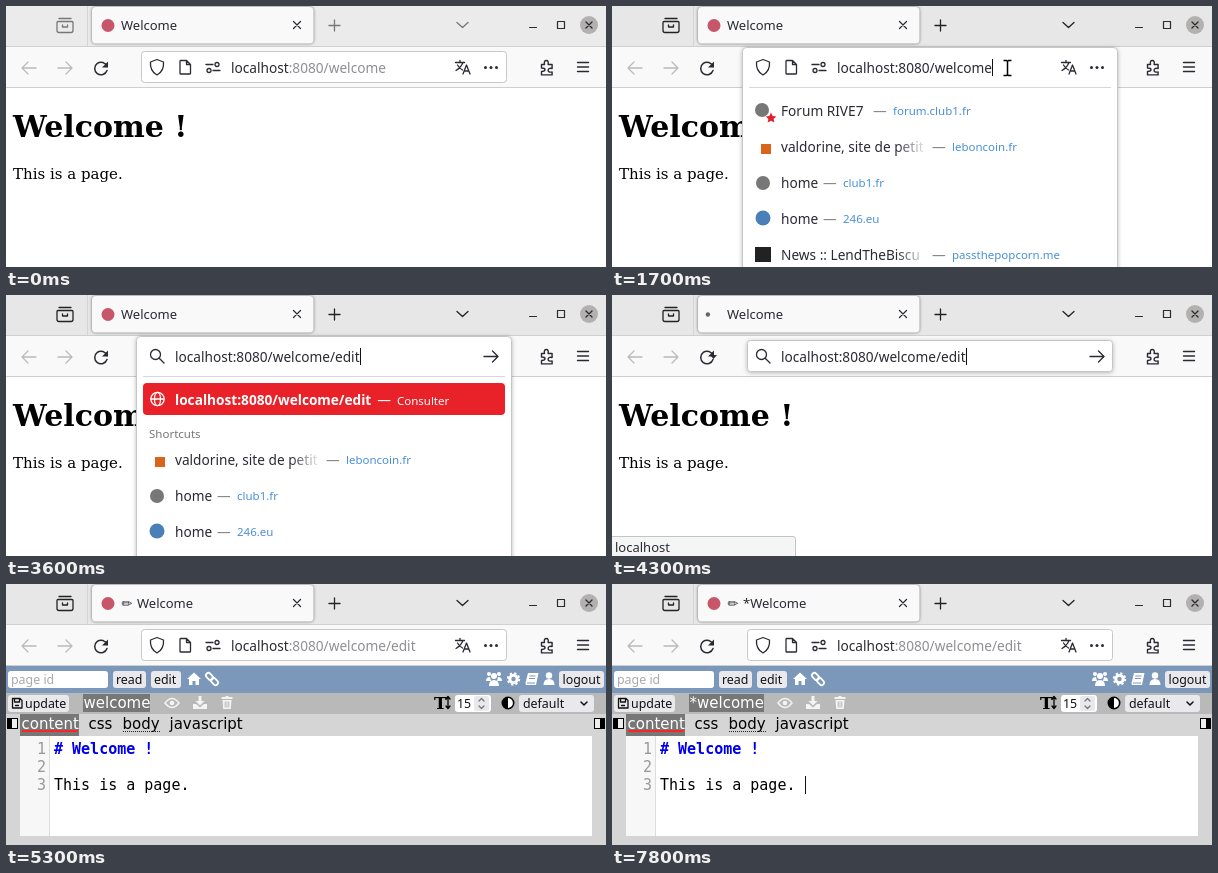
Recreate the animation shown at these times as an HTML page. Size 600 by 261 pixels, loop 8 s.

```html
<!DOCTYPE html>
<html lang="en">
<head>
<meta charset="utf-8">
<title>Editing a page in the browser</title>
<style>
html, body { margin: 0; width: 100%; height: 100%; overflow: hidden; background: #fff; }
svg { display: block; width: 100%; height: 100%; }
text { font: 13.67px "Noto Sans", sans-serif; fill: #2b2a33; white-space: pre; }
.tab { font-size: 13px; }
.small { font-size: 11.5px; }
.btn { font-size: 12.4px; fill: #111; }
.serif { font: 15px "DejaVu Serif", serif; fill: #000; }
.sans { font: 15px "DejaVu Sans", sans-serif; fill: #000; }
.mono { font: 15px "DejaVu Sans Mono", monospace; fill: #000; }
.dash { fill: #888; }
.link { font-size: 11.5px; fill: #4a90d9; }
.grey { fill: #8f8f94; }
.white { fill: #fff; }
.icon { fill: none; stroke: #2b2a33; stroke-width: 1.3; stroke-linecap: round; stroke-linejoin: round; }
.solid { fill: #fff; stroke: none; }
.popup { fill: #fff; stroke: #c6c6c6; filter: drop-shadow(0 1px 2px #0004); }
.caret { fill: #111; }
</style>
</head>
<body>
<!-- data-on lists the time spans, in ms, during which an element is shown -->
<svg viewBox="0 0 600 261">
  <defs>
    <linearGradient id="fade">
      <stop offset="0" stop-color="#fff" stop-opacity="0"/>
      <stop offset="1" stop-color="#fff"/>
    </linearGradient>
    <g id="shortcuts">
      <rect x="149" y="138" width="10" height="10" fill="#d9641c"/>
      <text x="169" y="146">valdorine, site de petit</text>
      <rect x="284" y="130" width="31" height="22" fill="url(#fade)"/>
      <rect x="315" y="130" width="9" height="22" fill="#fff"/>
      <text x="320" y="146" class="dash">—</text><text x="340" y="145" class="link">leboncoin.fr</text>
      <circle cx="151" cy="177" r="7" fill="#777"/>
      <text x="169" y="182">home</text>
      <text x="211" y="182" class="dash">—</text><text x="231" y="181" class="link">club1.fr</text>
      <circle cx="151" cy="212" r="7.5" fill="#4a80b8"/>
      <text x="169" y="218">home</text>
      <text x="211" y="218" class="dash">—</text><text x="231" y="217" class="link">246.eu</text>
      <rect x="143" y="241" width="16" height="15" fill="#222"/>
      <text x="169" y="254">News :: LendTheBiscu</text>
      <rect x="284" y="238" width="31" height="22" fill="url(#fade)"/>
      <rect x="315" y="238" width="9" height="22" fill="#fff"/>
      <text x="320" y="254" class="dash">—</text><text x="340" y="253" class="link">passthepopcorn.me</text>
    </g>
  </defs>

  <!-- Plain page -->
  <g data-on="0-4500">
    <rect y="82" width="600" height="179" fill="#fff"/>
    <text x="7" y="131" class="serif" style="font-size:30px;font-weight:bold">Welcome !</text>
    <text x="7" y="173" class="serif">This is a page.</text>
  </g>

  <!-- Edit page -->
  <g data-on="4500-8000">
    <rect y="82" width="600" height="27" fill="#7b98bb"/>
    <rect y="109" width="600" height="21" fill="#b9b9b9"/>
    <rect y="130" width="600" height="131" fill="#d5d5d5"/>
    <rect x="2" y="87" width="100" height="17" rx="3" fill="#fff"/>
    <text x="5" y="100" class="btn" style="fill:#aaa">page id</text>
    <g fill="#e9e9ed">
      <rect x="107" y="87" width="33" height="17" rx="3"/>
      <rect x="145" y="87" width="30" height="17" rx="3"/>
      <rect x="553" y="87" width="45" height="17" rx="3"/>
      <rect x="2" y="111" width="61" height="17" rx="3"/>
    </g>
    <text x="110" y="100" class="btn">read</text>
    <text x="148" y="100" class="btn">edit</text>
    <text x="556.5" y="100" class="btn">logout</text>
    <text x="19" y="124" class="btn">update</text>
    <path class="icon" style="stroke:#111" d="M6.5 114.500h7.500l2 2v7.500h-9.500zM8.500 115v3h5v-3M9.500 121.500h3"/>
    <path class="solid" d="M181 95l7-6.500 7 6.500h-2v6h-3.500v-4h-3v4h-3.500v-6z"/>
    <g class="icon" style="stroke:#fff;stroke-width:1.8">
      <rect x="199.500" y="90" width="8" height="5" rx="2.500" transform="rotate(45 203.500 92.500)"/>
      <rect x="204.500" y="95" width="8" height="5" rx="2.500" transform="rotate(45 208.500 97.500)"/>
    </g>
    <g class="solid">
      <circle cx="488" cy="92" r="3"/><circle cx="483" cy="90" r="2"/><circle cx="493" cy="90" r="2"/>
      <path d="M483 102q0-6 5-6t5 6zM480 97q0-4 4-4l1 4zM496 97q0-4-4-4l-1 4z"/>
      <circle cx="543" cy="91.500" r="3.200"/><path d="M537.500 101q0-6 5.500-6t5.500 6z"/>
      <path d="M522 89h10.500l-2.500 12h-10q-1-2 0-4z"/>
    </g>
    <circle cx="507.500" cy="95" r="3.700" fill="none" stroke="#fff" stroke-width="3"/>
    <circle cx="507.500" cy="95" r="5.700" fill="none" stroke="#fff" stroke-width="2" stroke-dasharray="2.240"/>
    <path d="M523.500 92h6M523 94.500h6M521 99h8" stroke="#7b98bb"/>

    <g data-on="4500-7800">
      <rect x="77" y="110" width="67" height="18" fill="#777"/>
      <text x="77.500" y="124" class="sans white">welcome</text>
    </g>
    <g data-on="7800-8000">
      <rect x="77" y="110" width="75" height="18" fill="#777"/>
      <text x="77.500" y="124" class="sans white">*welcome</text>
    </g>
    <g id="tools">
      <path class="icon" style="stroke:#f4f4f4;stroke-width:1.500" d="M159 119q7-9 14 0q-7 9-14 0z"/>
      <circle cx="166" cy="119" r="2.300" fill="#f4f4f4"/>
      <path fill="#f4f4f4" d="M192.500 112h3v5h3l-4.500 4.500-4.500-4.500h3zM187 120h3l4 3.500 4-3.500h3v5h-14zM215.500 113h3.500l1-1h2l1 1h3.500v2h-11zM216.500 116h9l-.7 9h-7.600z"/>
      <path d="M219.200 117.500v6M221 117.500v6M222.800 117.500v6" stroke="#b9b9b9"/>
    </g>

    <g id="options">
      <text x="318" y="125" style="font:bold 17px 'DejaVu Serif',serif;fill:#000">T</text>
      <path d="M332 113v11M330 115l2-2.500 2 2.500M330 122l2 2.500 2-2.500" class="icon" style="stroke:#000"/>
      <rect x="339" y="111" width="36" height="17" rx="3" fill="#fff"/>
      <text x="341" y="124" class="btn">15</text>
      <rect x="358" y="112" width="15" height="15" rx="2" fill="#e9e9ed"/>
      <path class="icon" style="stroke:#777" d="M363 117l2.500-2.500 2.500 2.500M363 122l2.500 2.500 2.500-2.500"/>
      <circle cx="392" cy="119" r="5.700" fill="#fff" stroke="#000" stroke-width="1.600"/>
      <path d="M392 113.500a5.500 5.500 0 0 0 0 11z"/>
      <rect x="403" y="111" width="75" height="17" rx="3" fill="#e9e9ed"/>
      <text x="407" y="124" class="btn">default</text>
      <path class="icon" style="stroke:#111;stroke-width:1.500" d="M465 118l3 3 3-3"/>
    </g>
    <g data-on="4500-4800">
      <rect x="488" y="111" width="110" height="17" rx="3" fill="#e9e9ed"/>
      <path class="icon" style="stroke:#111" d="M498 115h-6v9h9v-4M495 121l1-3 5-5 2 2-5 5z"/>
      <text x="506.500" y="124" class="btn">save workspace</text>
    </g>

    <rect x="14" y="130" width="59" height="22" fill="#777"/>
    <text x="15.500" y="145" class="sans white">content</text>
    <rect x="16" y="146" width="56" height="2" fill="#f22"/>
    <text x="82.500" y="145" class="sans">css</text>
    <text x="116.500" y="145" class="sans">body</text>
    <path d="M117 147.500h37" stroke="#222" stroke-dasharray="1"/>
    <text x="163.500" y="145" class="sans">javascript</text>
    <g fill="#eee" stroke="#000">
      <rect x="1.500" y="134.500" width="10" height="10"/><rect x="588.500" y="134.500" width="10" height="10"/>
    </g>
    <path d="M1 134h5v11h-5zM594 134h5v11h-5z"/>

    <g data-on="4500-4800">
      <rect x="14" y="153" width="572" height="101" rx="3" fill="#fff" stroke="#6f94c0" stroke-width="2"/>
      <text x="20" y="173" class="mono" style="fill:#333"># Welcome !</text>
      <text x="20" y="209" class="mono" style="fill:#333">This is a page.</text>
      <rect class="caret" x="20" y="159" width="1" height="18"/>
    </g>
    <g data-on="4800-8000">
      <rect x="14" y="152" width="572" height="100" fill="#fff"/>
      <rect x="14" y="152" width="29" height="100" fill="#f7f7f7"/>
      <rect x="43" y="152" width="1" height="100" fill="#ddd"/>
      <g style="--n:#999">
        <text x="31" y="170" class="mono" style="fill:var(--n)">1</text>
        <text x="31" y="188" class="mono" style="fill:var(--n)">2</text>
        <text x="31" y="206" class="mono" style="fill:var(--n)">3</text>
      </g>
      <text x="48" y="170" class="mono" style="fill:#00e;font-weight:bold"># Welcome !</text>
      <text x="48" y="206" class="mono">This is a page.</text>
      <rect class="caret" x="184" y="192" width="1" height="18" data-on="6200-6700 7300-7700"/>
      <rect class="caret" x="193" y="192" width="1" height="18" data-on="7700-8000"/>
    </g>
  </g>

  <!-- Browser frame -->
  <rect id="tabbar" width="600" height="41"/>
  <rect y="40" width="600" height="1" fill="#d0d0d0"/>
  <rect y="41" width="600" height="40" fill="#f9f9f9"/>
  <rect y="81" width="600" height="1" fill="#cfcfcf"/>
  <rect x="81" width="1" height="40" fill="#d4d4d4"/>
  <rect x="86" y="1" width="221.500" height="36.500" rx="4" fill="#f9f9f9" style="filter:drop-shadow(0 0 1.500px #0008)"/>
  <g id="shell" class="icon">
    <path d="M53 12.500h12M52 15.500h14q1 0 1 1v8q0 2-2 2h-12q-2 0-2-2v-8q0-1 1-1zM56.500 19v2h5v-2"/>
    <path d="M323 19.500h11M328.500 14v11M451 16.500l5.500 5 5.500-5"/>
  </g>
  <path class="icon" style="stroke-width:1.200" d="M287.500 15.500l7 7M294.500 15.500l-7 7M523.500 21.500h7M551.500 15.500h7v7h-7z"/>
  <circle cx="583" cy="19" r="9" fill="#b3b1af"/>
  <path class="icon" d="M580 16l6 6M586 16l-6 6"/>

  <circle cx="102" cy="19.500" r="6.500" fill="#c8566a" data-on="0-4300 5000-8000"/>
  <circle id="spinner" cy="19.500" r="2.200" fill="#666" data-on="4300-5000"/>
  <text x="115" y="24" class="tab" data-on="0-4500">Welcome</text>
  <text x="115.500" y="24" data-on="4500-8000" style="font:13px 'DejaVu Sans',sans-serif">✏</text>
  <text x="131" y="24" class="tab" data-on="4500-7800">Welcome</text>
  <text x="131" y="24" class="tab" data-on="7800-8000">*Welcome</text>

  <path class="icon" style="stroke:#bbb" d="M30 62h-14M22 56l-6 6 6 6M52 62h14M60 56l6 6-6 6"/>
  <g data-on="0-4400 5000-8000">
    <path class="icon" style="stroke-width:1.500" d="M101 60.500a6.300 6.300 0 1 0 0 4"/>
    <path d="M102 55.500v6h-6z" fill="#2b2a33"/>
    <path d="M98 60h7l-3.500 4z" fill="#2b2a33" data-on="4300-4400"/>
  </g>
  <path class="icon" data-on="4400-5000" d="M90 57l10 10M100 57l-10 10"/>
  <path class="icon" d="M535.500 58.500h3q-.8-4 1.800-4t1.800 4h4v4q-4-.8-4 1.700t4 1.700v3h-10.600v-3.500q3.500 0 3.500-1.700t-3.500-1.700z" style="stroke-width:1.400"/>
  <path class="icon" d="M571.500 56.500h11M571.500 61h11M571.500 65.500h11" style="stroke-width:1.400"/>

  <!-- Address bar -->
  <rect x="135.500" y="45.500" width="365" height="31" rx="3" fill="#fff" stroke="#c8c8c8" data-on="0-1400 4400-8000"/>
  <rect class="popup" x="135.500" y="45.500" width="365" height="31" rx="3" data-on="4300-4400"/>
  <rect class="popup" x="130.500" y="41.500" width="375" height="40" rx="4" data-on="1400-1500"/>
  <rect class="popup" x="130.500" y="41.500" width="375" height="230" rx="4" data-on="1500-3800"/>
  <rect class="popup" x="130.500" y="41.500" width="375" height="85" rx="4" data-on="3800-4300"/>
  <rect x="137" y="81" width="362" height="1" fill="#d8d8d8" data-on="1500-4300"/>

  <g data-on="0-2900 4400-8000">
    <g class="icon">
      <path d="M151 53.500l6.500 2.500q.8 9-6.500 13q-7.300-4-6.500-13z"/>
      <path d="M174.500 54.500h6l4 4v9q0 .5-.5 .5h-9.500q-.5 0-.5-.5v-12.500zM180.500 54.500v4h4"/>
      <path d="M200 58.500h7M207 64.500h7"/>
      <circle cx="211" cy="58.500" r="2"/><circle cx="203" cy="64.500" r="2"/>
    </g>
    <g fill="#2b2a33"><circle cx="479.500" cy="61.500" r="1.500"/><circle cx="485" cy="61.500" r="1.500"/><circle cx="490.500" cy="61.500" r="1.500"/></g>
  </g>
  <path class="icon" data-on="0-2900 5100-8000" d="M449.500 56.500h9M454 54.500v2M457 56.500q-2 5-7 8M451.500 59q2 3.500 5 5M457 68l3.500-9 3.500 9M458.300 65h4.500"/>
  <g class="icon" data-on="2900-4400">
    <circle cx="149.500" cy="59.500" r="5"/><path d="M153.200 63.200l4.800 4.800M478 61.500h14M486.500 56l5.500 5.500-5.500 5.500"/>
  </g>

  <text x="225" y="66.500" data-on="0-1400">localhost<tspan class="grey">:8080/welcome</tspan></text>
  <g data-on="1400-1700">
    <rect x="225" y="53" width="156" height="17" fill="#e92128"/>
    <text x="225" y="66.500" class="white">localhost:8080/welcome</text>
  </g>
  <text x="225" y="66.500" data-on="1700-2900">localhost:8080/welcome</text>
  <rect class="caret" x="380" y="53" width="1" height="17" data-on="1700-2600"/>
  <text id="typed" x="169" y="66.500" data-on="2900-4400"></text>
  <rect id="typedCaret" class="caret" y="53" width="1" height="17" data-on="2900-3800 4300-4400"/>
  <text x="225" y="66.500" data-on="4400-8000">localhost<tspan class="grey">:8080/welcome/edit</tspan></text>

  <!-- Suggestions -->
  <g data-on="1500-3000">
    <circle cx="150" cy="104" r="7" fill="#777"/>
    <path transform="translate(159 112)" fill="#e5202c" d="M0-5.500l1.600 3.500 3.800.4-2.800 2.500.8 3.700-3.400-1.900-3.400 1.900.8-3.700-2.800-2.500 3.800-.4z"/>
    <text x="169" y="110">Forum RIVE7</text>
    <text x="261" y="110" class="dash">—</text><text x="281" y="109" class="link">forum.club1.fr</text>
    <use href="#shortcuts"/>
  </g>
  <g data-on="3000-4300">
    <rect x="137" y="88" width="362" height="32" rx="4" fill="#e92128"/>
    <g class="icon" style="stroke:#fff">
      <circle cx="151.500" cy="104" r="6.700"/><ellipse cx="151.500" cy="104" rx="3" ry="6.700"/><path d="M145 104h13"/>
    </g>
    <text x="169" y="109.500" class="white"><tspan id="suggested" font-weight="bold" style="font-weight:bold"></tspan><tspan dx="6">—</tspan><tspan dx="6" class="small">Consulter</tspan></text>
  </g>
  <g data-on="3000-3800">
    <text x="143" y="143" class="small" style="fill:#77767b">Shortcuts</text>
    <use href="#shortcuts" y="24"/>
  </g>

  <!-- Status panel -->
  <g data-on="4300-4500">
    <path d="M-1 241.500h182q2.500 0 2.500 2.500v20h-185z" fill="#f4f6f6" stroke="#c4c4c4"/>
    <text x="3" y="257" class="tab">localhost</text>
  </g>
  <g data-on="4500-5000">
    <path d="M-1 241.500h256q2.500 0 2.500 2.500v20h-259z" fill="#f4f6f6" stroke="#c4c4c4"/>
    <text x="3" y="257" class="tab">Transfert des données depuis localhost…</text>
  </g>

  <g id="mouse" data-on="100-2900 5400-7700">
    <path id="arrow" d="M0 0v15l3.500-3.300 2.500 6 2.500-1-2.500-5.800h5z" fill="#000" stroke="#fff"/>
    <g id="beam" fill="none">
      <path d="M-4-7.500h3l1 1 1-1h3M0-6.500v13M-4 7.500h3l1-1 1 1h3" stroke="#fff" stroke-width="3"/>
      <path d="M-4-7.500h3l1 1 1-1h3M0-6.500v13M-4 7.500h3l1-1 1 1h3" stroke="#000" stroke-width="1.500"/>
    </g>
  </g>
</svg>
<script>
const LOOP = 8000, STEP = 100;
const $ = id => document.getElementById(id);

const timed = [...document.querySelectorAll('[data-on]')].map(el => ({
  el, spans: el.dataset.on.split(' ').map(span => span.split('-').map(Number))
}));

// Pointer stops: time, x, y
const route = [
  [100, 90, -4], [200, 100, 50], [300, 122, 105], [400, 168, 138], [500, 232, 130],
  [600, 300, 105], [700, 352, 80], [800, 385, 66], [900, 395.5, 62],
  [5300, 395.5, 62], [5600, 380, 100], [5800, 342, 168], [6000, 322.5, 198]
];

function pointerAt(t) {
  const i = route.findIndex(stop => stop[0] > t);
  if (i === 0) return route[0].slice(1);
  if (i < 0) return route.at(-1).slice(1);
  const [t0, x0, y0] = route[i - 1], [t1, x1, y1] = route[i];
  const k = (t - t0) / (t1 - t0);
  return [x0 + (x1 - x0) * k, y0 + (y1 - y0) * k];
}

const addressAt = t =>
  'localhost:8080/welcome' + '/edit'.slice(0, Math.max(1, Math.floor((t - 3000) / 100)));

function render(t) {
  for (const { el, spans } of timed)
    el.style.display = spans.some(([from, to]) => t >= from && t < to) ? '' : 'none';

  const active = t >= 1300;
  $('tabbar').setAttribute('fill', active ? '#e7e7e7' : '#ebebeb');
  $('shell').style.stroke = active ? '#222' : '#777';

  $('typed').textContent = addressAt(t);
  $('suggested').textContent = addressAt(t - 100);
  if (t >= 2900 && t < 4400)
    $('typedCaret').setAttribute('x', Math.round(169 + $('typed').getComputedTextLength()));

  $('spinner').setAttribute('cx', 102 - 6.5 * Math.cos((t - 4250) / 900 * 2 * Math.PI));
  $('options').setAttribute('transform', `translate(${t < 4800 ? 0 : 110})`);
  $('tools').setAttribute('transform', `translate(${t < 7800 ? 0 : 7})`);

  const [x, y] = pointerAt(t);
  const overText = (x > 220 && y > 45 && y < 77) || (t > 5300 && y > 152);
  $('mouse').setAttribute('transform', `translate(${x} ${y})`);
  $('arrow').style.display = overText ? 'none' : '';
  $('beam').style.display = overText ? '' : 'none';
}

const start = performance.now();
function tick() {
  const t = (performance.now() - start) % LOOP;
  render(Math.floor(t / STEP) * STEP);
  requestAnimationFrame(tick);
}
tick();
</script>
</body>
</html>
```
